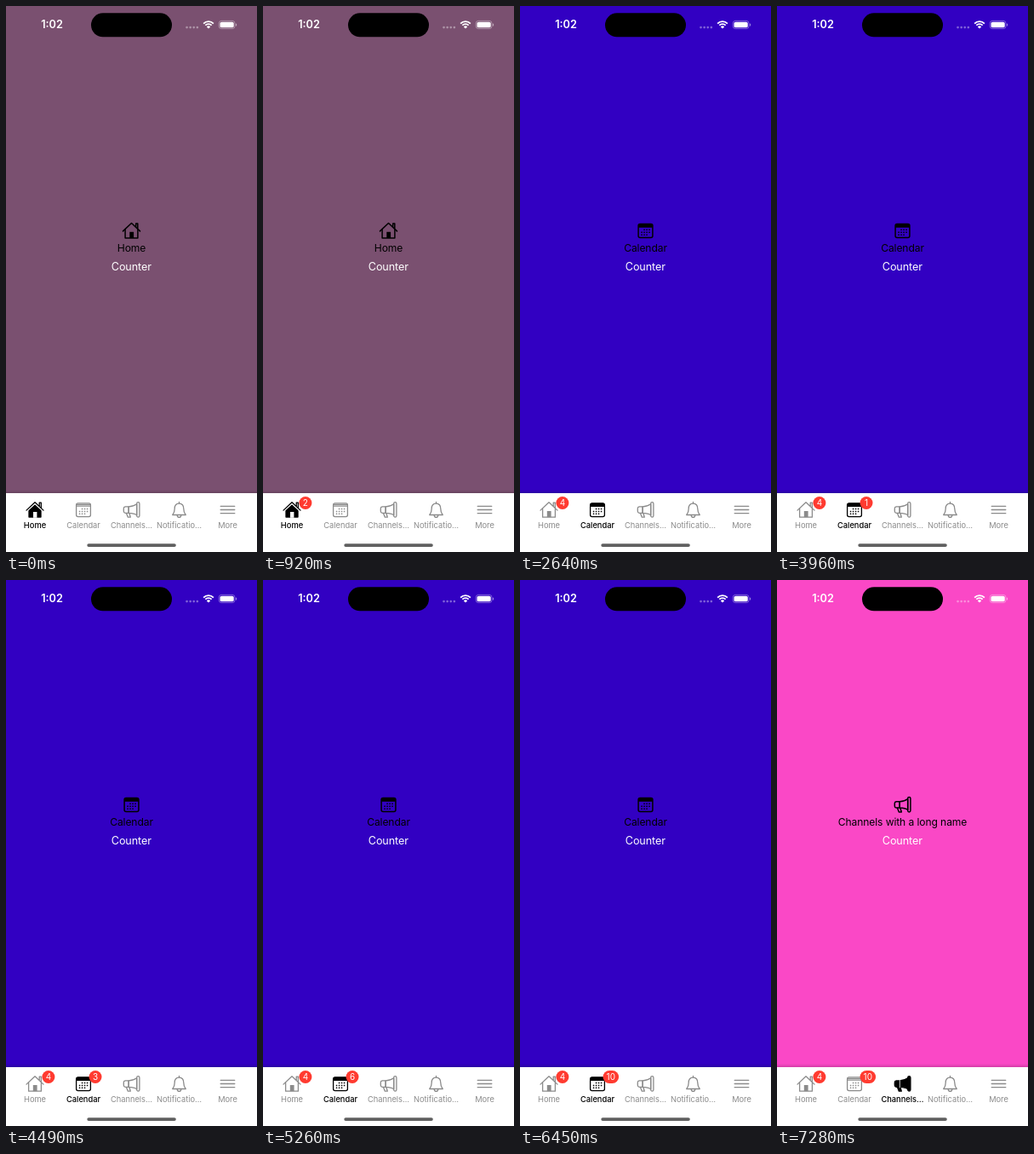
These frames come from a looping animation (295x640 px, 8 s). An HTML page with a canvas:

```html
<!DOCTYPE html>
<html lang="en">
<head>
<meta charset="utf-8">
<title>Tab badges</title>
<style>
html, body { margin: 0; width: 100%; height: 100%; overflow: hidden; }
canvas { display: block; width: 295px; height: 640px; }
</style>
</head>
<body>
<canvas id="stage"></canvas>
<script>
const W = 295, H = 640, LOOP = 8000;
const GRAY = '#8b8b8b', BLACK = '#000', WHITE = '#fff', RED = '#ff3b30';
const canvas = document.getElementById('stage');
const scale = window.devicePixelRatio || 1;
canvas.width = W * scale;
canvas.height = H * scale;
const ctx = canvas.getContext('2d');

const tabs = [
  { label: 'Home', title: 'Home', icon: house, x: 34, bg: '#7a5070', from: 0,
    taps: [500, 920, 1230, 1490] },
  { label: 'Calendar', title: 'Calendar', icon: calendar, x: 91, bg: '#3200c2', from: 2640,
    taps: [3960, 4240, 4490, 4900, 5080, 5260, 5470, 5830, 6070, 6450] },
  { label: 'Channels…', title: 'Channels with a long name', icon: megaphone, x: 147.5,
    bg: '#fa48c6', from: 7280, taps: [] },
  { label: 'Notificatio…', icon: bell, x: 203.5, taps: [] },
  { label: 'More', icon: menu, x: 260.5, taps: [] }
];

function text(str, x, y, size, color, weight = 400, spacing = 0) {
  ctx.font = `${weight} ${size}px Inter, "Liberation Sans", sans-serif`;
  ctx.letterSpacing = spacing + 'px';
  ctx.textAlign = 'center';
  ctx.fillStyle = color;
  ctx.fillText(str, x, y);
}

function box(x, y, w, h, r, color) {
  ctx.beginPath();
  ctx.roundRect(x, y, w, h, r);
  if (color) {
    ctx.fillStyle = color;
    ctx.fill();
  }
}

function shape(d, fill) {
  const path = new Path2D(d);
  if (fill) ctx.fill(path);
  ctx.stroke(path);
}

function place(icon, x, y, color, solid, width = 1.3) {
  ctx.save();
  ctx.translate(x, y);
  ctx.fillStyle = ctx.strokeStyle = color;
  ctx.lineWidth = width;
  ctx.lineJoin = ctx.lineCap = 'round';
  icon(color, solid);
  ctx.restore();
}

function house(color, solid) {
  shape('M-10 .6 L0 -8.8 L10 .6 M5.2 -4.4 V-8.3 H7.3 V-2.2');
  if (solid) {
    shape('M-7 1.2 L0 -5.4 L7 1.2 V8.6 H-7 Z', true);
    box(-2, 2.5, 4.4, 6.8, 0, WHITE);
  } else {
    shape('M-7.4 -1.4 V8.7 H7.4 V-1.4');
    box(-2.2, 1.5, 4.8, 7.2, 0, color);
  }
}

function calendar(color, solid) {
  box(-8.4, -7.7, 16.8, 15.8, 2);
  ctx.stroke();
  if (solid) box(-8.4, -7.7, 16.8, 4.2, [2, 2, 0, 0], color);
  else shape('M-8.2 -4.4 H8.2 M-8 -6.2 H8');
  for (let row = 0; row < 3; row++) {
    for (let col = 0; col < 4; col++) {
      if (row === 0 && col === 0 || row === 2 && col === 3) continue;
      box(-5.2 + col * 3, -1.7 + row * 2.9, 1.5, 1.5, .3, color);
    }
  }
}

function megaphone(color, solid) {
  shape('M-3.4 -3.6 C1 -3.8 4 -5 6.2 -6.7 V6.2 C4 4.5 1 3.9 -3.4 3.8 Z', solid);
  shape('M-3.4 -3.6 H-7.3 Q-9.2 -3.4 -9.2 -1.5 V1.8 Q-9.2 3.6 -7.3 3.8 H-3.4 Z', solid);
  shape('M-6 4 L-4.2 8.7 H-1.2 L-2.6 4', solid);
  box(6.2, -8.8, 3.2, 17.4, 1.6);
  if (solid) ctx.fill();
  ctx.stroke();
  if (solid) {
    ctx.strokeStyle = WHITE;
    ctx.lineWidth = .8;
    shape('M-3.2 -4.4 V4.4');
  }
}

function bell() {
  shape('M0 -7.4 C-4.1 -7.4 -5.3 -4.4 -5.3 -1.2 C-5.3 3 -6.4 4 -7.8 6 H7.8 C6.4 4 5.3 3 5.3 -1.2 C5.3 -4.4 4.1 -7.4 0 -7.4 Z');
  shape('M0 -9 V-7.6 M-2.3 6.4 C-2.1 9.7 2.1 9.7 2.3 6.4');
}

function menu() {
  shape('M-8.3 -4.2 H8.3 M-8.3 0 H8.3 M-8.3 4.2 H8.3');
}

function statusBar() {
  text('1:02', 54, 26.4, 12.7, WHITE, 600);
  box(100, 8.3, 95, 28, 14, BLACK);
  for (let i = 0; i < 4; i++) box(211.2 + i * 4.1, 23.7, 2.7, 2.7, 1.35, 'rgba(255,255,255,.38)');

  ctx.strokeStyle = WHITE;
  ctx.lineCap = 'butt';
  ctx.lineWidth = 1.8;
  for (const r of [8.3, 5.2]) {
    ctx.beginPath();
    ctx.arc(238, 26.4, r, -Math.PI * .75, -Math.PI * .25);
    ctx.stroke();
  }
  ctx.beginPath();
  ctx.moveTo(238, 26.6);
  ctx.arc(238, 26.6, 3.1, -Math.PI * .75, -Math.PI * .25);
  ctx.fillStyle = WHITE;
  ctx.fill();

  ctx.strokeStyle = 'rgba(255,255,255,.45)';
  ctx.lineWidth = .8;
  box(250.2, 17.4, 18.8, 9.2, 3);
  ctx.stroke();
  box(251.5, 18.7, 16.2, 6.6, 1.9, WHITE);
  box(270, 20.5, 1.1, 3, .6, 'rgba(255,255,255,.5)');
}

function badge(count, x) {
  const str = String(count), w = str.length > 1 ? 18.6 : 15;
  box(x, 575, w, 15, 7.5, RED);
  text(str, x + w / 2, 586.1, 10, WHITE);
}

function tabBar(active, t) {
  const shade = ctx.createLinearGradient(0, 567, 0, 571);
  shade.addColorStop(0, 'rgba(0,0,0,0)');
  shade.addColorStop(1, 'rgba(0,0,0,.16)');
  ctx.fillStyle = shade;
  ctx.fillRect(0, 567, W, 4);
  ctx.fillStyle = WHITE;
  ctx.fillRect(0, 571, W, H - 571);

  for (const tab of tabs) {
    const on = tab === active, color = on ? BLACK : GRAY;
    place(tab.icon, tab.x, 590.5, color, on);
    text(tab.label, tab.x, 612, 9.3, color, on ? 500 : 400);
    const count = tab.taps.filter(at => t >= at).length;
    if (count) badge(count, tab.x + (tab.icon === house ? 8.4 : 6.5));
  }
  box(95.3, 630.2, 104.5, 3.8, 1.9, '#606060');
}

function draw(now) {
  const t = now % LOOP;
  const active = tabs.filter(tab => t >= tab.from).pop();
  ctx.setTransform(scale, 0, 0, scale, 0, 0);
  ctx.fillStyle = active.bg;
  ctx.fillRect(0, 0, W, H);
  statusBar();
  place(active.icon, 147.5, 263.3, BLACK, active.icon === calendar, 1.5);
  text(active.title, 147.5, 288, 12.1, BLACK, 400, -.1);
  text('Counter', 147.3, 310, 12.6, WHITE, 400, -.1);
  tabBar(active, t);
}

let start;
function tick(now) {
  if (start === undefined) start = now;
  draw(now - start);
  requestAnimationFrame(tick);
}
requestAnimationFrame(tick);
</script>
</body>
</html>
```
